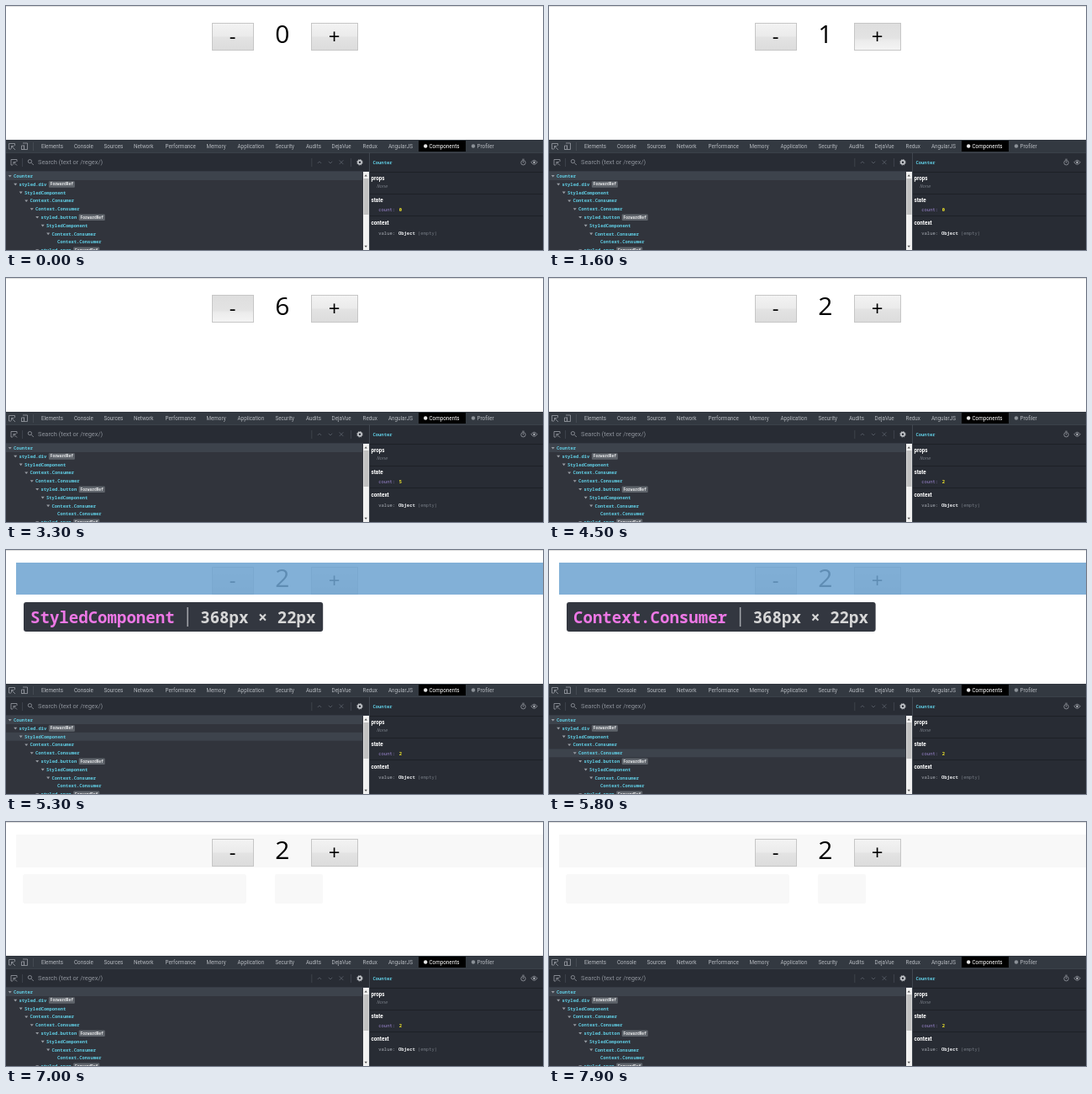
Recreate the animation shown at these times as an HTML page. Size 639 px wide and 290 px high, loop 8000 ms.

```html
<!DOCTYPE html>
<html>
<head>
<meta charset="utf-8">
<style>
html, body { margin: 0; width: 100%; height: 100%; overflow: hidden; background: #fff; }
svg { display: block; width: 639px; height: 290px; font-family: "Open Sans", "Noto Sans", sans-serif; }
text { white-space: pre; }
.mono { font-family: "Noto Sans Mono", "DejaVu Sans Mono", monospace; font-size: 5.47px; }
.b { font-weight: 700; }
.tab, .head, .search { font-family: Roboto, sans-serif; }
.tab { font-size: 6.3px; fill: #b4b8be; }
.head { font-size: 6.3px; font-weight: 700; fill: #fff; }
.search { font-size: 7.45px; fill: #8d929a; }
.tip { font-size: 19.07px; font-weight: 700; }
.icon { fill: none; stroke: #9a9ea5; stroke-width: .8; }
.dim { stroke: #5c626c; }
</style>
</head>
<body>
<svg id="stage" viewBox="0 0 639 290">
  <defs>
    <linearGradient id="up" x2="0" y2="1">
      <stop offset="0" stop-color="#f3f3f3"/><stop offset=".48" stop-color="#ebebeb"/>
      <stop offset=".52" stop-color="#e3e3e3"/><stop offset="1" stop-color="#dcdcdc"/>
    </linearGradient>
    <linearGradient id="down" x2="0" y2="1">
      <stop offset="0" stop-color="#dedede"/><stop offset=".55" stop-color="#e3e3e3"/>
      <stop offset=".65" stop-color="#ececec"/><stop offset="1" stop-color="#f4f4f4"/>
    </linearGradient>
  </defs>
</svg>
<script>
const LOOP = 8000;
const stage = document.getElementById('stage');
const $ = id => document.getElementById(id);
const rect = (x, y, w, h, fill, extra = '') =>
  `<rect x="${x}" y="${y}" width="${w}" height="${h}" fill="${fill}" ${extra}/>`;
const text = (x, y, s, cls, extra = '') => `<text x="${x}" y="${y}" class="${cls}" ${extra}>${s}</text>`;
const icon = (d, cls = '') => `<path class="icon ${cls}" d="${d}"/>`;
const dot = (x, fill) => `<circle cx="${x}" cy="166.5" r="2.2" fill="${fill}"/>`;

// Tree rows: name, indent level, forwardRef badge
const rows = [
  ['Counter', 0], ['styled.div', 1, 1], ['StyledComponent', 2], ['Context.Consumer', 3],
  ['Context.Consumer', 4], ['styled.button', 5, 1], ['StyledComponent', 6],
  ['Context.Consumer', 7], ['Context.Consumer', 8], ['styled.span', 5, 1]
];
const PITCH = 9.8;
const tabs = [
  [42, 'Elements'], [81, 'Console'], [116.5, 'Sources'], [152, 'Network'], [189.5, 'Performance'],
  [238.5, 'Memory'], [275.5, 'Application'], [320.5, 'Security'], [357, 'Audits'], [387.5, 'DejaVue'],
  [424.5, 'Redux'], [455, 'AngularJS'], [560.5, 'Profiler']
];

function treeRow([name, level, badge], i) {
  const x = 9 + 6.5 * level, y = 204 + PITCH * i;
  let out = text(x, y, name, 'mono b', 'fill="#61cfe6"');
  if (i !== 8) out += `<path d="M${x - 6.3} ${y - 3}h4l-2 2.6z" fill="#989ca3"/>`;
  if (badge) {
    const bx = x + name.length * 3.28 + 2.6;
    out += rect(bx, y - 5.6, 31, 7.6, '#5f646b', 'rx="1"') +
      text(bx + 1.8, y - .4, 'ForwardRef', 'mono b', 'style="font-size:4.55px" fill="#e4e5e7"');
  }
  return out;
}

const button = (id, x, w, sign) =>
  rect(x + .5, 20.5, w - 1, 32, 'url(#up)', `id="${id}" stroke="#c6c6c6"`) +
  text(x + w / 2 - .4, 45, sign, '', 'font-size="24" text-anchor="middle"');

const page =
  rect(0, 0, 639, 290, '#fff') + rect(0, 0, 639, 1, '#dedede') +
  `<g id="strip">${rect(12, 15, 627, 39, '#f8f8f8')}${rect(20, 62, 266, 35, '#f8f8f8', 'rx="3"')}</g>` +
  rect(320, 62, 57, 35, '#f8f8f8', 'id="stub" rx="2"') +
  button('minus', 245, 50, '-') + button('plus', 363, 56, '+') +
  text(328.8, 44.4, '0', '', 'id="num" font-size="30" text-anchor="middle"') +
  `<g id="hover">${rect(12, 15, 627, 38, 'rgba(110,163,209,.86)')}
   ${rect(21, 62, 0, 35, '#333740', 'id="tipBox" rx="3"')}
   ${text(29, 86.5, '', 'mono tip', 'id="tipName" fill="#ee78e6"')}
   ${rect(0, 68, 1.5, 23, '#a4a7ac', 'id="tipBar"')}
   ${text(0, 86.5, '368px × 22px', 'mono tip', 'id="tipSize" fill="#d7d7d7"')}</g>`;

const tabBar =
  rect(0, 159, 639, 131, '#282c34') + rect(0, 159, 639, 15, '#333941') +
  rect(418, 159, 31, 15, '#3f454e', 'id="redux"') + rect(491, 160, 56, 13, '#000') +
  rect(0, 174, 639, .8, '#40464f') + rect(32, 162, .7, 10, '#4b515a') +
  icon('M6 170H3.5V163.5H10.5V166M6.5 166.5L11 171M6.5 169.5V166.5H9.5') +
  icon('M20 170.5H18.5V166M20 163H25.5V170.5H21.5V165.5M18.5 166H21.5V170.5H18.5') +
  tabs.map(([x, s]) => text(x, 168.7, s, 'tab')).join('') +
  dot(499.2, '#e6e6e6') + text(503.5, 168.7, 'Components', 'tab', 'style="fill:#fff"') + dot(556, '#8b9097');

const tree =
  rect(0, 197, 432, 93, '#31343c') +
  icon('M8 189H6V182.5H13V185M9 185.5L13 189.5M9 188.5V185.5H12') +
  rect(19, 181, .7, 10, '#454b55') +
  icon('M30.2 186.4L32.8 189') + '<circle class="icon" cx="28.4" cy="184.6" r="2.1"/>' +
  text(38, 188.2, 'Search (text or /regex/)', 'search') +
  rect(363.5, 181, .7, 10, '#454b55') + rect(410.3, 181, .7, 10, '#454b55') +
  icon('M370.8 187L373 184.8L375.2 187M383.8 184.8L386 187L388.2 184.8M396.6 183.3L401.4 188.1M401.4 183.3L396.6 188.1', 'dim') +
  '<circle cx="421" cy="185.8" r="2.1" class="icon" style="stroke:#c4c7cb;stroke-width:1.7"/>' +
  '<circle cx="421" cy="185.8" r="3.3" class="icon" style="stroke:#c4c7cb" stroke-dasharray="1.3 1.29"/>' +
  rect(0, 196.3, 432, .7, '#3d434c') +
  rect(0, 197, 424, 10, '#3d434c') + rect(0, 0, 424, PITCH, '#3d434c', 'id="rowBg"') +
  rows.map(treeRow).join('') +
  rect(425, 197, 7, 93, '#f1f1f1') + rect(425.5, 205, 6, 43, '#c1c1c1') +
  '<path d="M426.5 202.5h3.4l-1.7-2.2zM426.5 284.8h3.4l-1.7 2.2z" fill="#555"/>';

const details =
  rect(432, 174, 1, 116, '#40464f') +
  text(436.5, 188, 'Counter', 'mono b', 'fill="#61cfe6"') +
  '<circle class="icon" cx="615.5" cy="186.2" r="2.7"/>' + icon('M614.3 182.2H616.7M615.5 184.5V186.5') +
  icon('M624.8 185.8Q628.5 180.8 632.2 185.8Q628.5 190.8 624.8 185.8Z') +
  '<circle cx="628.5" cy="185.8" r="1.4" fill="#a3a7ad"/>' +
  [197, 223, 249].map(y => rect(433, y, 206, 1, '#1d2026')).join('') +
  text(434.5, 206.7, 'props', 'head') + text(434.5, 232.8, 'state', 'head') + text(434.5, 260.2, 'context', 'head') +
  text(441, 216, 'None', 'mono', 'fill="#747a83" font-style="italic"') +
  text(443.3, 244, 'count:', 'mono', 'fill="#9d87d2"') + text(467.8, 244, '0', 'mono b', 'id="state" fill="#f0e629"') +
  text(443.3, 271.5, 'value:', 'mono', 'fill="#a9adb5"') + text(467, 271.5, 'Object', 'mono b', 'fill="#eceef0"') +
  text(490, 271.5, '(empty)', 'mono', 'fill="#747a83"');

stage.insertAdjacentHTML('beforeend', page + tabBar + tree + details);

// Step tracks: [start ms, value]
const count = [[0, 0], [1300, 1], [1700, 2], [2000, 3], [2200, 4], [2400, 5], [2700, 6],
  [3400, 5], [3700, 4], [3900, 3], [4100, 2]];
const state = [[0, 0], [1700, 1], [2600, 5], [4500, 2]];
const hovered = [[0, -1], [4800, 1], [5300, 2], [5700, 3], [5800, 4], [6300, 3], [6500, 4],
  [6600, 3], [6700, 2], [6800, 1], [6900, 0], [7000, -1]];
// Press intervals
const plusDown = [[1200, 1300], [1600, 1700], [1800, 2000], [2100, 2200], [2300, 2400], [2600, 2700]];
const minusDown = [[3300, 3400], [3600, 3700], [3800, 3900], [4000, 4100]];

const at = (track, t) => track.filter(([start]) => start <= t).pop()[1];
const during = (spans, t) => spans.some(([a, b]) => t >= a && t < b);
const show = (id, on) => $(id).setAttribute('visibility', on ? 'visible' : 'hidden');
const press = (id, on) => $(id).setAttribute('fill', `url(#${on ? 'down' : 'up'})`);

function draw(now) {
  const t = now % LOOP, row = at(hovered, t);
  $('num').textContent = at(count, t);
  $('state').textContent = at(state, t);
  press('plus', during(plusDown, t));
  press('minus', during(minusDown, t));
  show('strip', t >= 7000);
  show('stub', t >= 6800);
  show('redux', t >= 7500 && t < 7600);
  show('hover', row >= 0);
  show('rowBg', row >= 0);
  if (row >= 0) {
    const name = rows[row][0], bar = 44.6 + name.length * 11.44;
    $('rowBg').setAttribute('y', 197.3 + PITCH * row);
    $('tipName').textContent = name;
    $('tipBar').setAttribute('x', bar - .8);
    $('tipSize').setAttribute('x', bar + 15);
    $('tipBox').setAttribute('width', bar + 140);
  }
  requestAnimationFrame(() => draw(performance.now()));
}
draw(performance.now());
</script>
</body>
</html>
```
